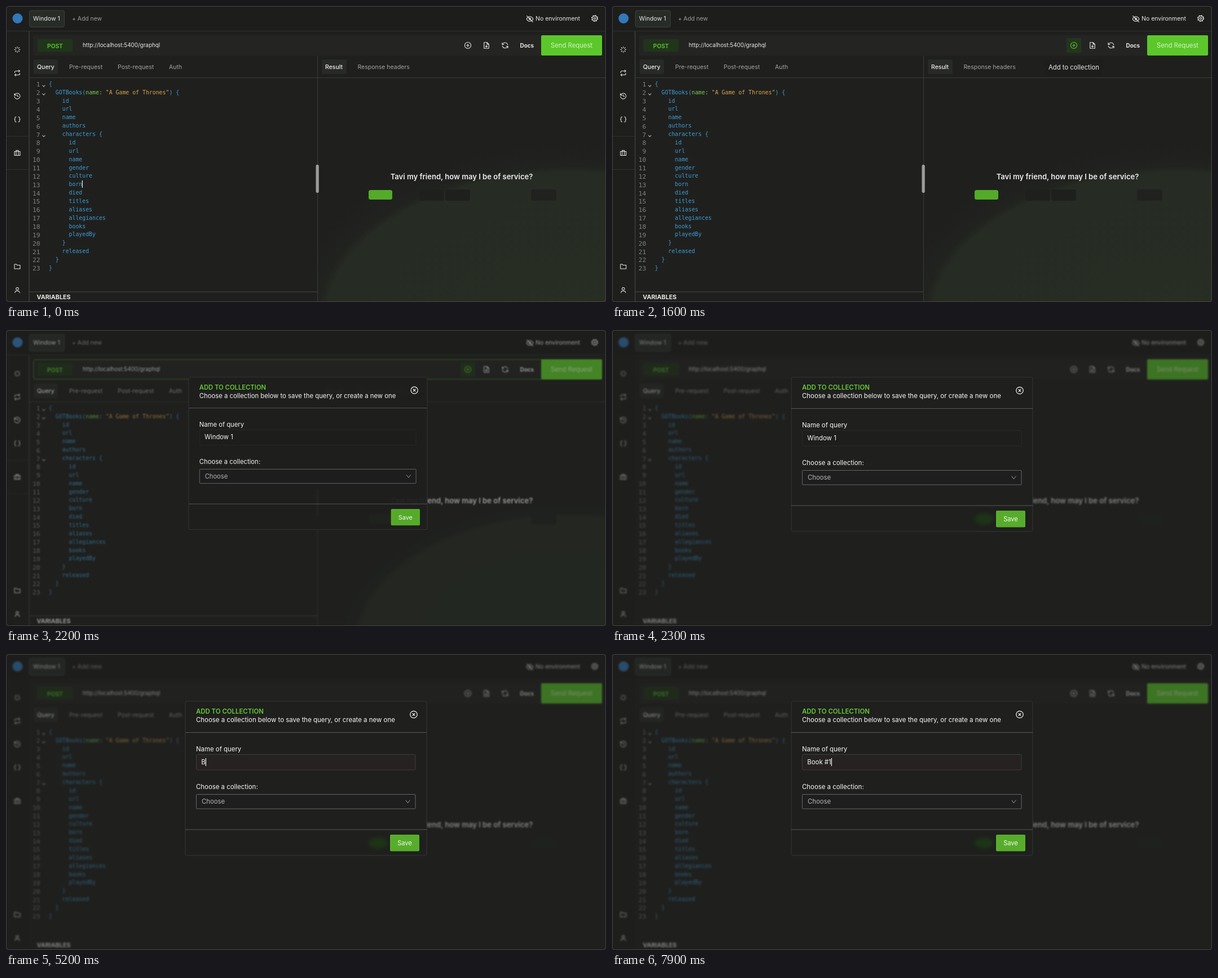
Animation of 1064 by 526 pixels, one loop 8000 ms. Source, as an HTML page:

```html
<!DOCTYPE html>
<html lang="en">
<head>
<meta charset="utf-8">
<title>Query client</title>
<style>
  html, body { margin: 0; width: 100%; height: 100%; overflow: hidden; background: #1f201e; }
  svg { display: block; width: 100vw; height: 100vh; }
  text { font-family: Inter, sans-serif; white-space: pre; }
  .code { font-family: "DejaVu Sans Mono", monospace; }
</style>
</head>
<body>
<svg id="stage" viewBox="0 0 1064 526">
  <defs>
    <radialGradient id="glowFill">
      <stop offset="0" stop-color="#282e24"/>
      <stop offset=".84" stop-color="#262b23"/>
      <stop offset=".87" stop-color="#21231f"/>
      <stop offset="1" stop-color="#20211f" stop-opacity="0"/>
    </radialGradient>
    <clipPath id="resultPane"><rect x="553" y="128" width="511" height="398"/></clipPath>
  </defs>
</svg>
<script>
const stage = document.getElementById('stage');
const LIGHT = '#e8e8e8', WHITE = '#f8f8f8', MUTED = '#a3a5a2', GREEN = '#5cc72b', LINE = '#393c38';

function add(parent, tag, attrs = {}) {
  const el = document.createElementNS('http://www.w3.org/2000/svg', tag);
  for (const key in attrs) el.setAttribute(key, attrs[key]);
  parent.append(el);
  return el;
}
const group = (parent, attrs) => add(parent, 'g', attrs);
const box = (parent, x1, y1, x2, y2, fill, extra) =>
  add(parent, 'rect', { x: x1, y: y1, width: x2 - x1, height: y2 - y1, fill, ...extra });
const stroke = (parent, d, color, width = 1, extra) =>
  add(parent, 'path', { d, fill: 'none', stroke: color, 'stroke-width': width, ...extra });
function label(parent, x, y, string, size, fill = LIGHT, extra) {
  const el = add(parent, 'text', { x, y, 'font-size': size, fill, ...extra });
  el.textContent = string;
  return el;
}
const ring = (cx, cy, r) => `M${cx - r} ${cy}a${r} ${r} 0 1 1 ${2 * r} 0a${r} ${r} 0 1 1 ${-2 * r} 0`;
// Icons live on a 24 unit grid, centred on x, y.
const icon = (parent, x, y, d, scale = 0.53) => stroke(parent, d, LIGHT, 2.1, {
  transform: `translate(${x} ${y}) scale(${scale}) translate(-12 -12)`,
  'stroke-linecap': 'round', 'stroke-linejoin': 'round'
});

const ICONS = {
  burst: 'M12 2v4M12 18v4M4.9 4.9l2.9 2.9M16.2 16.2l2.9 2.9M2 12h4M18 12h4M4.9 19.1l2.9-2.9M16.2 7.8l2.9-2.9',
  swap: 'M17 1l4 4-4 4M3 11V9a4 4 0 0 1 4-4h14M7 23l-4-4 4-4M21 13v2a4 4 0 0 1-4 4H3',
  history: 'M2 3v6h6M2.5 9A10 10 0 1 1 2 13M12 7v5l4 2',
  braces: 'M8 3H7a3 3 0 0 0-3 3v3a3 3 0 0 1-2 3 3 3 0 0 1 2 3v3a3 3 0 0 0 3 3h1M16 3h1a3 3 0 0 1 3 3v3a3 3 0 0 0 2 3 3 3 0 0 0-2 3v3a3 3 0 0 1-3 3h-1',
  cases: 'M2 7h20v14H2zM8 21V3h8v18',
  folder: 'M22 20H2V4h7l2 3h11z',
  user: ring(12, 8, 4.5) + 'M4 22v-2a5 5 0 0 1 5-4h6a5 5 0 0 1 5 4v2',
  eyeOff: 'M1 12s4-8 11-8 11 8 11 8-4 8-11 8S1 12 1 12M2 2l20 20' + ring(12, 12, 3),
  plus: ring(12, 12, 10.5) + 'M12 7.5v9M7.5 12h9',
  file: 'M14 2H4v20h16V8l-6-6v6h6M12 11v7M9 15l3 3 3-3',
  reload: 'M2 3v6h6M22 21v-6h-6M2.5 9A10 10 0 0 1 21.5 10M21.5 15A10 10 0 0 1 2.5 14'
};

// Main page
const page = group(stage);
box(page, 0, 0, 1064, 526, '#1f201e');
box(page, 0, 0, 1064, 44, '#1d1e1c');
box(page, 0, 45, 40, 526, '#1e1f1d');
const glow = add(page, 'ellipse', {
  cx: 1000, cy: 560, fill: 'url(#glowFill)', 'clip-path': 'url(#resultPane)'
});
const dividers = group(page);
stroke(dividers, 'M0 44.5H1064M0 231.5H40M0 290.5H40', '#2e312d');
stroke(dividers, 'M41 45V526M41 508H552', '#393c39', 1.6);
stroke(dividers, 'M41 127.5H1064M552.5 88V526', LINE);

add(page, 'circle', { cx: 20.5, cy: 22, r: 9, fill: '#3378b8' });
box(page, 41.5, 8, 103.5, 37.5, '#282c27', { stroke: '#3a4038', rx: 3 });
label(page, 48, 26.3, 'Window 1', 10.6);
label(page, 117, 26.3, '+ Add new', 10.4, '#9a9c99');
icon(page, 929, 23, ICONS.eyeOff);
label(page, 939, 26.3, 'No environment', 10.5);
const gear = group(page, { fill: 'none', stroke: LIGHT });
add(gear, 'circle', { cx: 1044, cy: 22, r: 4.4, 'stroke-width': 1.2 });
add(gear, 'circle', { cx: 1044, cy: 22, r: 5.3, 'stroke-width': 1.4, 'stroke-dasharray': '2.1 2.06' });
add(gear, 'circle', { cx: 1044, cy: 22, r: 1.7, 'stroke-width': 1.1 });

[['burst', 77.5], ['swap', 119], ['history', 160], ['braces', 201.5],
 ['cases', 261], ['folder', 463], ['user', 504.5]]
  .forEach(([name, y]) => icon(page, 20, y, ICONS[name], 0.5));

// Request bar
box(page, 48, 52, 950, 88, '#242523', { rx: 2 });
box(page, 56, 59, 118, 81, '#20351a', { rx: 2 });
label(page, 87, 75.2, 'POST', 10.2, '#58b92d', { 'font-weight': 700, 'text-anchor': 'middle' });
label(page, 136, 72.8, 'http://localhost:5400/graphql', 9.9);
const hover = box(page, 806, 57, 832, 83, '#22361b', { rx: 2 });
const plusIcon = icon(page, 819, 70, ICONS.plus);
icon(page, 852, 70, ICONS.file);
icon(page, 885, 70, ICONS.reload, 0.5);
label(page, 911.5, 73.8, 'Docs', 9.9, LIGHT, { 'font-weight': 700 });
const focusFrame = box(page, 49, 52.5, 1056, 87.5, 'none', { stroke: '#3a8023', rx: 3 });
box(page, 949, 52, 1057, 88, GREEN, { rx: 2 });
label(page, 1003, 74.2, 'Send Request', 11.3, '#d3f5bf', { 'text-anchor': 'middle' });

// Tabs
box(page, 49, 95, 92, 121, '#282a27', { rx: 3 });
box(page, 560, 95, 604, 121, '#282a27', { rx: 3 });
[[55, 'Query'], [112, 'Pre-request'], [198, 'Post-request'], [289, 'Auth'],
 [566, 'Result'], [623.5, 'Response headers']]
  .forEach(([x, name]) => {
    const active = name === 'Query' || name === 'Result';
    label(page, x, 111.8, name, 10.5, active ? '#f0f0f0' : MUTED, { 'font-weight': active ? 500 : 400 });
  });

// Editor
const ROW = 14.86, BLUE = '#3d9bd6';
const code = `{
  GOTBooks(
    id
    url
    name
    authors
    characters {
      id
      url
      name
      gender
      culture
      born
      died
      titles
      aliases
      allegiances
      books
      playedBy
    }
    released
  }
}`.split('\n');
code.forEach((line, i) => {
  const y = 138 + ROW * i;
  label(page, 60.5, y + 5.4, i + 1, 11.3, '#80837f', { class: 'code', 'text-anchor': 'end' });
  const row = label(page, 76, y + 3.9, line, 9.86, BLUE, { class: 'code' });
  if (i === 1) {
    [['name:', '#79c653'], [' "A Game of Thrones"', '#dfa14c'], [') {', BLUE]].forEach(([part, fill]) => {
      add(row, 'tspan', { fill }).textContent = part;
    });
  }
  if ([0, 1, 6].includes(i)) stroke(page, `M64.5 ${y + 2.5}l2.5 2.8 2.5-2.8`, '#b0b2af', 1.1);
});
const editorCaret = box(page, 134.8, 310, 136, 323, '#f0f0f0');
label(page, 54.5, 520.8, 'VARIABLES', 10.75, LIGHT, { 'font-weight': 700 });
box(page, 549.5, 282, 554.8, 332, '#9b9c9a', { rx: 2.5 });

// Result pane
label(page, 808, 307.5, 'Tavi my friend, how may I be of service?', 13.05, '#ececec',
  { 'font-weight': 600, 'text-anchor': 'middle' });
box(page, 643, 327, 685, 344, '#54aa29', { rx: 3.5 });
box(page, 931, 326, 976, 346, '#20221f', { rx: 4 });
const dimKeys = group(page);
[733, 779].forEach(x => box(dimKeys, x, 326, x + 44, 346, '#1e201d', { rx: 4 }));

const tooltip = group(stage);
box(tooltip, 767, 95, 871, 123, '#1d1e1c', { rx: 3 });
label(tooltip, 774, 113, 'Add to collection', 11.3);

// Dialog
const dialog = group(stage);
const panel = box(dialog, 318, 84, 746, 358, '#1f1f1e', { stroke: '#343633', rx: 3 });
const shade = add(dialog, 'ellipse', {
  cx: 660, cy: 336, rx: 17, ry: 10, fill: '#1d3416', style: 'filter: blur(3px)'
});
stroke(dialog, 'M318 139.5H746M318 312H746', '#555a58');
label(dialog, 337, 106.2, 'ADD TO COLLECTION', 11.4, '#66cc36', { 'font-weight': 600 });
label(dialog, 337, 121.2, 'Choose a collection below to save the query, or create a new one', 11.45, WHITE);
stroke(dialog, ring(723, 107.5, 6.2) + 'M720.7 105.2l4.6 4.6M725.3 105.2l-4.6 4.6', WHITE, 1.2);
label(dialog, 337, 173, 'Name of query', 11.4, WHITE);
const field = box(dialog, 337.5, 178.5, 726, 206, '#1e1e1d', { rx: 2 });
const selection = box(dialog, 346, 183, 398, 201, '#ffffff');
const fieldText = label(dialog, 346.3, 196, '', 11.4);
const fieldCaret = box(dialog, 0, 185, 1.2, 199, WHITE);
label(dialog, 337, 240, 'Choose a collection', 11.4, WHITE);
label(dialog, 443.5, 240, ':', 11.4, WHITE);
const select = box(dialog, 337.5, 249.5, 726, 275, '#1d1e1d', { stroke: '#646866', rx: 1 });
label(dialog, 347, 266, 'Choose', 11.3, '#b4b6b4');
stroke(dialog, 'M708.5 259.5l4 5 4-5', '#7d807d', 1.1);
box(dialog, 681, 321, 733, 350.5, '#57ad2b', { rx: 2 });
label(dialog, 707, 339.8, 'Save', 11.1, '#f4fbef', { 'text-anchor': 'middle' });

box(stage, 0.5, 0.5, 1063.5, 525.5, 'none', { stroke: '#454944', rx: 5 });

// Step tables: [time, value]
const TYPING = [[0, 'Window 1'], [5200, 'B'], [5500, 'Bo'], [5600, 'Boo'], [5700, 'Book'],
  [6000, 'Book '], [6500, 'Book #'], [6900, 'Book #1']];
const EDITOR_CARET = [[0, 1], [500, 0], [1000, 1], [1600, 0]];
const FIELD_CARET = [[0, 0], [3600, 1], [3900, 0], [5200, 1], [7400, 0], [7900, 1]];
const ZOOM = [[0, 0], [2100, 0.74], [2200, 0.985], [2300, 1]];
const PAGE_OPACITY = [[0, 1], [2100, 0.95], [2200, 0.6], [2300, 0.5]];
const PAGE_BLUR = [[0, 0], [2200, 1], [2300, 1.4]];

const at = (table, t) => table.findLast(([start]) => start <= t)[1];
const ramp = (t, from, to) => Math.min(1, Math.max(0, (t - from) / (to - from)));
const show = (el, opacity) => el.setAttribute('opacity', +opacity);

function draw(t) {
  const opened = t >= 2300;
  const hovered = opened ? 0 : ramp(t, 100, 500);
  show(hover, hovered);
  plusIcon.setAttribute('stroke', hovered > 0.5 ? '#62c437' : LIGHT);
  show(tooltip, t >= 2200 ? 0 : ramp(t, 300, 700));
  show(focusFrame, t >= 2000 && !opened);
  show(editorCaret, at(EDITOR_CARET, t));
  show(dimKeys, t < 2000);
  show(dividers, !opened);
  show(glow, !opened);
  const spread = t < 2000 ? 1 : 0.86;
  glow.setAttribute('rx', 515 * spread);
  glow.setAttribute('ry', 315 * spread);

  show(page, at(PAGE_OPACITY, t));
  const blur = at(PAGE_BLUR, t);
  page.style.filter = blur ? `blur(${blur}px)` : 'none';

  // The dialog grows out of the clicked plus button; its surfaces fill in later than its text.
  const zoom = at(ZOOM, t);
  show(dialog, zoom);
  [panel, field, select].forEach(el => el.setAttribute('fill-opacity', zoom ** 3));
  show(shade, opened);
  dialog.setAttribute('transform', `translate(819 70) scale(${0.2 + 0.8 * zoom}) translate(-819 -70)`);

  const focused = t >= 3600, selected = t >= 3900 && t < 5200;
  field.setAttribute('fill', focused ? '#262222' : '#1e1e1d');
  field.setAttribute('stroke', focused ? '#433c3d' : '#2a2b29');
  show(selection, selected);
  fieldText.textContent = at(TYPING, t);
  fieldText.setAttribute('fill', selected ? '#1f1f1f' : WHITE);
  fieldCaret.setAttribute('x', 346.3 + fieldText.getComputedTextLength());
  show(fieldCaret, at(FIELD_CARET, t));
}

const LOOP = 8000, STEP = 100;
const begin = performance.now();
function tick() {
  const elapsed = (performance.now() - begin + 2) % LOOP;
  draw(Math.floor(elapsed / STEP) * STEP);
  requestAnimationFrame(tick);
}
tick();
</script>
</body>
</html>
```
